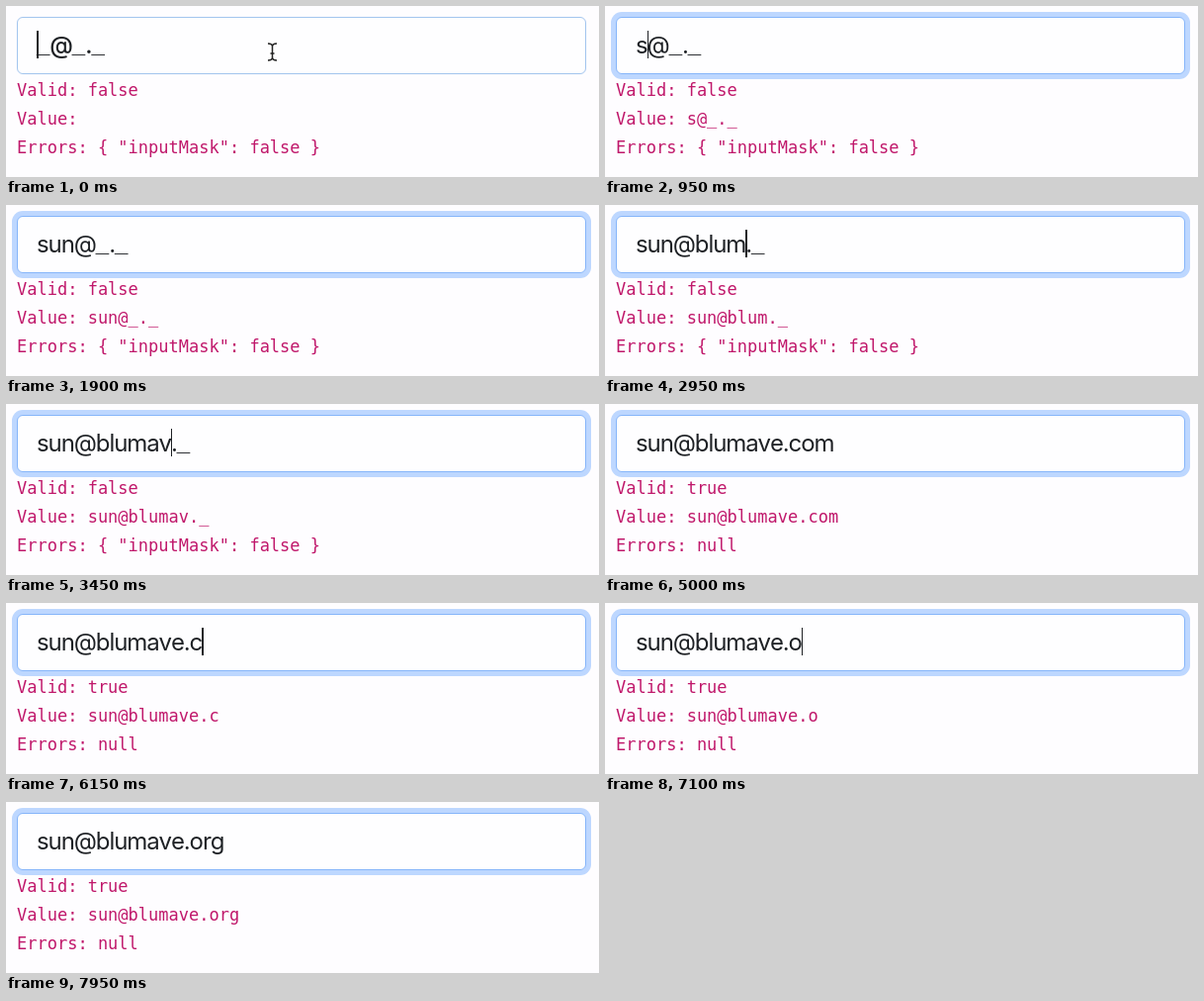
Animation of 600 by 173 pixels, one loop 8 s. Source, as an HTML page:

```html
<!DOCTYPE html>
<html lang="en">
<head>
<meta charset="utf-8">
<title>Email input mask</title>
<style>
  html, body { margin: 0; width: 100%; height: 100%; overflow: hidden; background: #fefdff; }
  #stage { position: relative; width: 600px; height: 173px; overflow: hidden; }
  #field {
    position: absolute; left: 11px; top: 11px; width: 576px; height: 58px;
    box-sizing: border-box; border: 1.5px solid; border-radius: 6px; background: #fefeff;
  }
  #text {
    position: absolute; left: 31px; top: 26px; white-space: pre; color: #1e2125;
    font: 24px/28px Inter, sans-serif; letter-spacing: -1.1px;
    font-kerning: none; font-feature-settings: "calt" 0;
  }
  #text u {
    position: relative; top: -1.5px; text-decoration: none; letter-spacing: 0;
    font-family: "Liberation Sans", sans-serif; font-weight: bold;
  }
  #text i { position: relative; }
  #text i::before {
    content: ""; position: absolute; left: 0; top: 0;
    width: 1.5px; height: 28px; background: #1e2125;
  }
  #info {
    position: absolute; left: 11px; top: 71px; margin: 0; color: #c0186b;
    font: 17px/29px "DejaVu Sans Mono", monospace;
  }
  #mouse { position: absolute; left: 263px; top: 36px; }
</style>
</head>
<body>
<div id="stage">
  <div id="field"></div>
  <div id="text"></div>
  <pre id="info"></pre>
  <svg id="mouse" width="13" height="21" fill="none">
    <path id="beam" d="M2 2Q6.5 2 6.5 5Q6.5 2 11 2M6.5 5V16M2 19Q6.5 19 6.5 16Q6.5 19 11 19M4.5 12H8.5" stroke="#fff" stroke-width="3.5"/>
    <use href="#beam"/>
    <path d="M2 2Q6.5 2 6.5 5Q6.5 2 11 2M6.5 5V16M2 19Q6.5 19 6.5 16Q6.5 19 11 19M4.5 12H8.5" stroke="#222" stroke-width="1.5"/>
  </svg>
</div>
<script>
const LOOP = 8000, BLINK = 500;
const $ = id => document.getElementById(id);
const first = "sun@blumave.com", second = "sun@blumave.org";

// Each key press: [time, what has been typed so far]
const keys = [[0, ""]];
const press = (text, length, times) =>
  times.forEach((t, i) => keys.push([t, text.slice(0, length(i))]));
press(first, i => i + 1, [950, 1150, 1350, 2100, 2350, 2550, 2750, 2950,
                          3150, 3400, 3600, 3850, 4100, 4350, 4480]);
press(first, i => 14 - i, [5950, 6100, 6300]);
press(second, i => 13 + i, [6950, 7150, 7400]);

const mix = (a, b, p) => `rgb(${a.map((v, i) => Math.round(v + (b[i] - v) * p))})`;
const markup = s => s.replace(/_/g, "<u>_</u>");
let shown = "";

function draw(t) {
  const [since, typed] = keys.filter(k => k[0] <= t).pop();
  const [user, domain, zone] = typed.split(/[@.]/);
  const masked = `${user || "_"}@${domain || "_"}.${zone || "_"}`;
  const caret = Math.floor((t - since) / BLINK) % 2 === 0 ? "<i></i>" : "";
  const at = typed.length;

  const html = markup(masked.slice(0, at)) + caret + markup(masked.slice(at));
  if (html !== shown) {
    $("text").innerHTML = shown = html;
    $("info").textContent = [
      "Valid: " + !!zone,
      "Value: " + (typed && masked),
      "Errors: " + (zone ? "null" : '{ "inputMask": false }')
    ].join("\n");
  }

  // Focus ring grows in
  const k = Math.min(1, (t + 40) / 190), p = k * k * (3 - 2 * k);
  $("field").style.borderColor = mix([168, 200, 236], [134, 181, 250], p);
  $("field").style.boxShadow = `0 0 0 ${5 * p}px rgba(13,110,253,${0.27 * p})`;
  $("text").style.fontWeight = t < 150 ? 500 : 400;
  $("mouse").style.display = t < 500 ? "" : "none";
}

const start = performance.now();
function tick(now) {
  draw(Math.max(0, now - start) % LOOP);
  requestAnimationFrame(tick);
}
draw(0);
requestAnimationFrame(tick);
</script>
</body>
</html>
```
